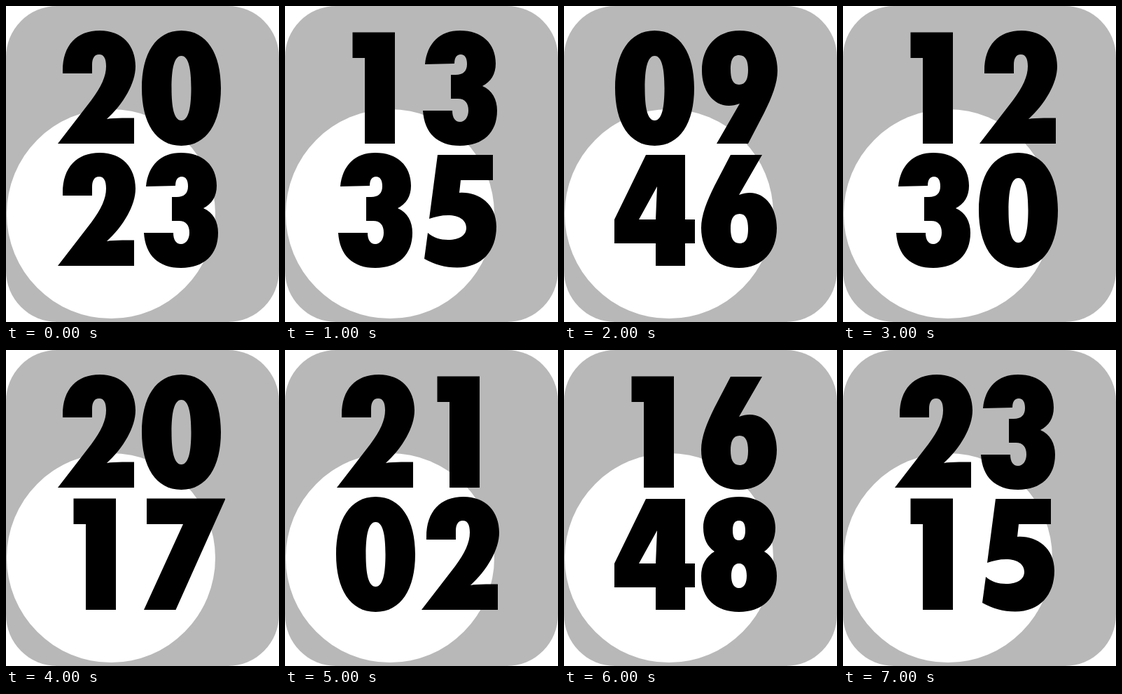
An HTML page for the animation above (8000 ms loop, 390 px wide and 450 px high).

```html
<!DOCTYPE html>
<html lang="en">
<head>
<meta charset="utf-8">
<title>Clock face</title>
<style>
  html, body { margin: 0; width: 100%; height: 100%; overflow: hidden; background: #fff; }
  svg { display: block; width: 390px; height: 450px; }
</style>
</head>
<body>
<svg id="face" viewBox="0 0 390 450" role="img">
  <rect width="390" height="450" rx="73" fill="#b8b8b8"/>
  <circle cx="150" cy="296" r="149" fill="#fff"/>
  <g id="digits" fill="#000" fill-rule="evenodd"></g>
</svg>
<script>
const STEP = 1000;
const TIMES = ['2023', '1335', '0946', '1230', '2017', '2102', '1648', '2315'];
const COLUMN = 121, ROW = 174;

const SIX = 'M117 38H162L129 95C160 83 183 108 183 142C183 176 162 199 129 199S75 176 75 142C75 124 83 104 94 82Z' +
  'M130 122C120 122 117 131 117 143S120 164 130 164 142 155 142 143 139 122 130 122Z';

// Digit outlines, placed in the upper left cell.
const GLYPHS = [
  'M129.5 35C166 35 186 68 186 117S166 199 129.5 199 73 166 73 117 93 35 129.5 35Z' +
    'M129.5 71C119 71 115.5 90 115.5 117S119 163 129.5 163 143.5 144 143.5 117 140 71 129.5 71Z',
  'M96.5 37.5H157V196H114V74H96.5Z',
  'M81 96V92C81 56 101 35 134 35C166 35 185 56 185 86C185 110 168 139 144 161Q152 159.5 166 159.5H183V196H74' +
    'L122 134C136 115 143 100 143 86C143 75 140 69 133 69C126 69 123 75 123 84V96Z',
  'M79 83C82 53 100 35 129 35C160 35 180 53 180 82C180 97 173 108 161 114C175 120 182 133 182 149' +
    'C182 180 162 199 129 199C97 199 78 181 76 149H118C118 159 122 165 129 165C136 165 141 158 141 149' +
    'C141 138 136 132 126 132H116V98H123C133 98 139 93 139 83C139 74 136 69 130 69C124 69 121 74 121 82Z',
  'M117 38H173V130H187V164H173V196H131V164H72V130ZM133 83L107 130H131Z',
  'M97 38H176V74H130L128 92C153 90 181 106 181 140C181 175 160 198.5 125 198.5C108 198.5 92 194 78 186L83 149' +
    'C91 156 101 159 112 159C129 159 138 152 138 142C138 131 128 124 112 124C102 124 94 126 85 129Z',
  SIX,
  'M80 37.5H192V39L121.5 196H76L132 74H80Z',
  'M129 35C160 35 181 53 181 79C181 95 175 106 165 113C177 120 183 132 183 148C183 180 162 199 129 199' +
    'S75 180 75 148C75 132 82 120 94 113C84 106 78 95 78 79C78 53 98 35 129 35Z' +
    'M129 69C122 69 120 75 120 83S122 97 129 97 138 91 138 83 136 69 129 69Z' +
    'M129 130C121 130 118 138 118 147.5S121 165 129 165 140 157 140 147.5 137 130 129 130Z',
  SIX
];

const face = document.getElementById('face');
const group = document.getElementById('digits');
const cells = [0, 1, 2, 3].map(() =>
  group.appendChild(document.createElementNS('http://www.w3.org/2000/svg', 'path')));

function show(time) {
  cells.forEach((cell, i) => {
    const digit = +time[i];
    const move = `translate(${COLUMN * (i % 2)} ${ROW * (i >> 1)})`;
    cell.setAttribute('d', GLYPHS[digit]);
    // A nine is a six turned upside down.
    cell.setAttribute('transform', digit === 9 ? move + ' rotate(180 129.5 117)' : move);
  });
  face.setAttribute('aria-label', time.slice(0, 2) + ':' + time.slice(2));
}

const start = performance.now();
let current = 0;
show(TIMES[0]);

function tick() {
  const next = Math.floor((performance.now() - start) / STEP) % TIMES.length;
  if (next !== current) show(TIMES[current = next]);
  requestAnimationFrame(tick);
}
requestAnimationFrame(tick);
</script>
</body>
</html>
```
